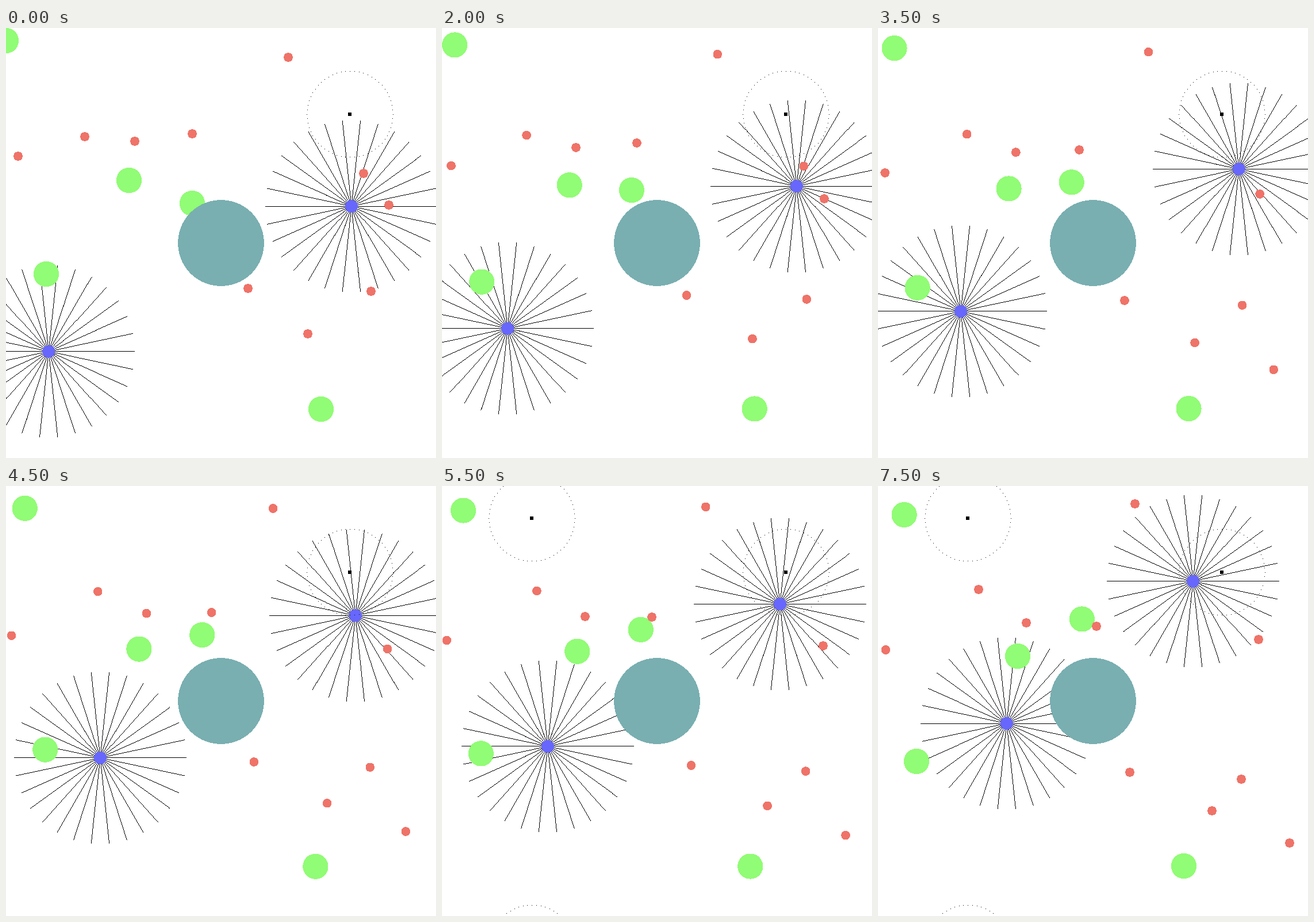
A matplotlib script that plays this animation: 748x748 px, repeating every 8000 ms.

```python
import matplotlib.pyplot as plt
import numpy as np
from matplotlib.animation import FuncAnimation
from matplotlib.collections import PolyCollection
from matplotlib.patches import Circle, Rectangle

SIZE, FRAMES, STEP_MS = 748, 16, 500
LAST = FRAMES - 1
UNIT = SIZE / 750  # the world is 750 units wide
RAY, RING = 150 * UNIT, 75 * UNIT
GREEN_R, RED_R, HUB_R = 22, 7.7, 11
MIDDLE = np.array([SIZE / 2, SIZE / 2])
CAUGHT_AT, RING_AT = 7, 10

# Drifters go straight from the first point to the second in one loop
GREEN_ROUTES = [((0, 22), (32, 50)), ((214, 265), (243, 296)),
                ((324, 305), (358, 236)), ((70, 428), (67, 479)),
                ((548, 663), (532, 661))]
RED_ROUTES = [((491, 51), (447, 31)), ((137, 189), (175, 180)),
              ((224, 197), (258, 238)), ((324, 184), (380, 244)),
              ((21, 223), (2, 285)), ((666, 308), (662, 267)),
              ((421, 453), (438, 498)), ((635, 458), (632, 510)),
              ((525, 532), (581, 565))]
PREY_ROUTE = ((622, 253), (649, 205))
NEWBORN_ROUTE = ((664, 571), (716, 621))
# The hunter turns towards its prey, catches it, then resumes its diagonal
HUNT = np.array([(0, 602.5, 311), (2, 608.5, 296), (6, 628.5, 256),
                 (7, 629.5, 246), (15, 549.5, 166)])

fig = plt.figure(figsize=(SIZE / 100, SIZE / 100), dpi=100, facecolor="white")
ax = fig.add_axes([0, 0, 1, 1])
ax.set(xlim=(0, SIZE), ylim=(SIZE, 0))
ax.axis("off")


def along(route, t):
    a, b = np.array(route, float)
    x, y = a + (b - a) * t / LAST
    return abs(x - RED_R) + RED_R, y  # bounces off the left wall


def soft_path(route):
    """Straight drift, eased out of the left wall and the central disc."""
    a, b = np.array(route, float)
    path = [a]
    for _ in range(LAST):
        p = path[-1]
        away = p - MIDDLE
        dist = np.hypot(*away)
        push = max(0, GREEN_R + RING - dist) * away / dist
        push[0] += max(0, GREEN_R - p[0])
        path.append(p + (b - a) / LAST + 0.3 * push)
    return path


def hub_positions(t):
    d = 10 * UNIT * t
    hunter = [UNIT * np.interp(t, HUNT[:, 0], HUNT[:, k]) for k in (1, 2)]
    return np.array([(74.2 + d, 562.6 - d), hunter])


def squares(points):
    """One-pixel squares under the given points."""
    corners = np.array([(0, 0), (1, 0), (1, 1), (0, 1)])
    return np.floor(points)[:, None, :] + corners


def pixels(z, points=np.zeros((1, 2))):
    art = PolyCollection(squares(points), facecolor="black", lw=0, zorder=z)
    return ax.add_collection(art, autolim=False)


def disc(r, color, z, xy=(0, 0)):
    # Unsmoothed fills cover every touched pixel, hence the smaller radius
    return ax.add_patch(Circle(xy, r - 0.5, fc=color, lw=0,
                               antialiased=False, zorder=z))


def circle_points(r, degrees):
    a = np.radians(np.arange(0, 360, degrees))
    return r * np.column_stack([np.cos(a), np.sin(a)])


def ray(tip):
    n = int(np.ceil(np.abs(tip).max()))
    return np.linspace((0, 0), tip, n + 1)


def ring(x, y):
    """Dotted circle, wrapped vertically, around a small square."""
    dots = circle_points(RING, 6) + (x, y)
    dots[:, 1] %= SIZE
    box = Rectangle((int(x) - 3, int(y) - 3), 6, 6, fc="black", lw=0, zorder=6)
    return pixels(6, dots), ax.add_patch(box)


rays = np.concatenate([ray(tip) for tip in circle_points(RAY, 12)])
green_paths = [soft_path(route) for route in GREEN_ROUTES]

stars = pixels(1)
hubs = [disc(HUB_R, "#6767fd", 2) for _ in range(2)]
greens = [disc(GREEN_R, "#91fc75", 3) for _ in GREEN_ROUTES]
reds = [disc(RED_R, "#ef7368", 4) for _ in RED_ROUTES]
hunted = disc(RED_R, "#ef7368", 4)
disc(RING, "#79afb1", 5, MIDDLE)
ring(598.6, 150)
late_ring = ring(156.6, 56)


def draw(t):
    centers = hub_positions(t)
    stars.set_verts(squares(np.concatenate([rays + c for c in centers])))
    for hub, c in zip(hubs, centers):
        hub.center = c
    for green, path in zip(greens, green_paths):
        green.center = path[t]
    for red, route in zip(reds, RED_ROUTES):
        red.center = along(route, t)
    hunted.center = along(PREY_ROUTE if t < CAUGHT_AT else NEWBORN_ROUTE, t)
    for part in late_ring:
        part.set_visible(t >= RING_AT)
    return []


anim = FuncAnimation(fig, draw, frames=FRAMES, interval=STEP_MS,
                     repeat=True, repeat_delay=0, blit=False)
plt.show()
```
